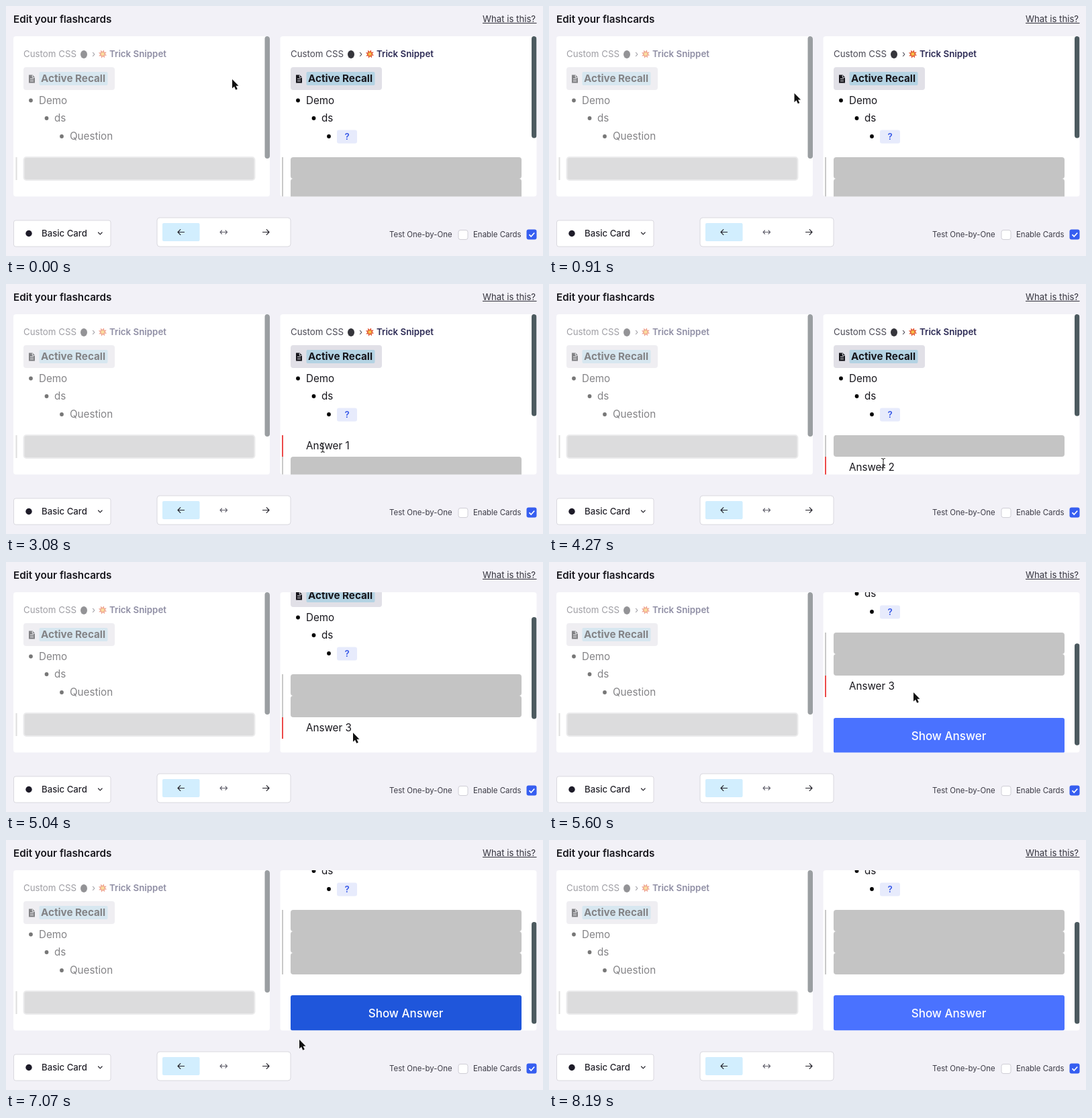
Animation of 800x372 px, one loop 8.26 s. Source, as an HTML page:

```html
<!DOCTYPE html>
<html lang="en">
<head>
<meta charset="utf-8">
<title>Edit your flashcards</title>
<style>
  html, body { margin: 0; width: 100%; height: 100%; overflow: hidden; background: #f2f1f7; }
  svg { display: block; width: 800px; height: 372px; font-family: Inter, "Open Sans", sans-serif; }
  .body { font-size: 15.2px; fill: #17161c; }
  .crumb { font-size: 13.3px; fill: #4a4954; }
  .small { font-size: 11.45px; fill: #3b3a45; }
  .semi { font-weight: 600; }
  .bold { font-weight: 700; }
  .box { fill: #fff; stroke: #d9d8df; }
  .icon { fill: none; stroke: #25242c; stroke-width: 1.2; stroke-linecap: round; stroke-linejoin: round; }
  .hidden { fill: #c4c4c4; }
</style>
</head>
<body>
<svg viewBox="0 0 800 372">
  <defs>
    <clipPath id="leftClip"><rect x="11" y="45" width="382" height="238.5" rx="4"/></clipPath>
    <clipPath id="rightClip"><rect x="408.5" y="45" width="382" height="238.5" rx="4"/></clipPath>
    <!-- breadcrumb, title and outline shared by both cards -->
    <g id="outline">
      <text class="crumb" x="424" y="76">Custom CSS</text>
      <ellipse cx="514" cy="72" rx="5" ry="6" fill="#35353b"/>
      <text class="crumb" x="526" y="76">›</text>
      <polygon id="burst" fill="#e0502f"/>
      <polygon id="spark" fill="#f8c34a"/>
      <text class="crumb semi" x="552" y="76" style="fill:#2d2b55">Trick Snippet</text>
      <rect x="424" y="91" width="136" height="34" rx="4" fill="#e1e0e7"/>
      <path d="M432 102.5h5.5l3.5 3.5v8.5h-9z" fill="#17161c"/>
      <path d="M434 108.5h5M434 111.5h5M437.3 103v3.4h3.5" stroke="#e1e0e7" fill="none"/>
      <rect x="447.500" y="98" width="102" height="20" rx="2" fill="#b4d3e3"/>
      <text class="body bold" x="450" y="113">Active Recall</text>
      <circle cx="435" cy="140.500" r="2.900"/>
      <text class="body" x="447" y="146">Demo</text>
      <circle cx="458.500" cy="167" r="2.900"/>
      <text class="body" x="470" y="172">ds</text>
      <circle cx="481" cy="194" r="2.900"/>
    </g>
  </defs>

  <rect width="800" height="372" fill="#f2f1f7"/>
  <text class="body semi" x="11" y="25">Edit your flashcards</text>
  <text x="710" y="23.500" font-size="13.2" fill="#34333d">What is this?</text>
  <path d="M710 25.500h80.500" stroke="#34333d"/>

  <g clip-path="url(#leftClip)">
    <rect x="11" y="45" width="383" height="239" fill="#fff"/>
    <g opacity=".53">
      <use href="#outline" x="-398"/>
      <text class="body" x="95" y="199">Question</text>
    </g>
    <rect x="14.500" y="225" width="2" height="34" fill="#dedede"/>
    <rect x="26.500" y="225" width="344" height="34" rx="4" fill="#dcdcdd" stroke="#ebebec" stroke-width="2"/>
    <rect x="385.500" y="45" width="7.500" height="182" rx="3.700" fill="#9a9ea1"/>
  </g>

  <g clip-path="url(#rightClip)">
    <rect x="408" y="45" width="383" height="239" fill="#fff"/>
    <g id="scroll">
      <use href="#outline"/>
      <rect x="493" y="184.500" width="30" height="20" rx="3" fill="#e7ebfc"/>
      <text class="semi" x="508" y="199" font-size="13.300" text-anchor="middle" fill="#3a5be8">?</text>
      <g id="answers"></g>
      <rect id="button" x="424" y="352" width="344" height="52.500" rx="3"/>
      <text x="595.500" y="385" font-size="17" font-weight="500" text-anchor="middle" fill="#fff">Show Answer</text>
    </g>
    <rect id="bar" x="783" width="7.500" height="151.500" rx="3.700" fill="#4c5a5f"/>
  </g>

  <rect class="box" x="11.500" y="319" width="144.500" height="39" rx="3"/>
  <circle cx="34" cy="338.500" r="4.700" fill="#1d1b28"/>
  <text x="53" y="343" font-size="13.200" font-weight="500" fill="#25242c">Basic Card</text>
  <path class="icon" d="M137.500 337l2.800 2.800 2.800-2.800"/>

  <rect class="box" x="225" y="315" width="199" height="43" rx="4"/>
  <rect x="233" y="323" width="55.500" height="27" rx="2" fill="#d2eefe"/>
  <path class="icon" d="M265.500 336.500h-9.500m3.800-3.800l-3.800 3.800 3.800 3.800"/>
  <path class="icon" stroke-width="1" style="stroke:#666570" d="M319 336.500h10.500m-8-2.500l-2.500 2.500 2.500 2.500m5.500-5l2.500 2.500-2.500 2.500"/>
  <path class="icon" d="M382.500 336.500h9.500m-3.800-3.800l3.800 3.800-3.800 3.800"/>

  <text class="small" x="571" y="344">Test One-by-One</text>
  <rect x="674" y="333.500" width="14" height="14" rx="3" fill="#fff" stroke="#cfced6"/>
  <text class="small" x="696" y="344">Enable Cards</text>
  <rect x="775.500" y="332.500" width="15" height="15" rx="3" fill="#365ef0"/>
  <path d="M779.500 340.200l2.700 2.800 5-5.500" fill="none" stroke="#fff" stroke-width="1.700"/>

  <g id="cursor">
    <path id="arrow" d="M0 0v13.500l3-2.800 2.300 5 2.500-1.100-2.300-4.800h4z" fill="#111" stroke="#fff" stroke-width="1" paint-order="stroke"/>
    <path id="beam" d="M-3-6.500q3 0 3 2 0-2 3-2M0-4.500v10M-3 7.500q3 0 3-2 0 2 3 2M-1.500 2.500h3" fill="none" stroke="#333" stroke-width="1.100"/>
  </g>
</svg>

<script>
const LOOP = 8260, STEP = 70, ROW = 32, FIRST = 225;
const $ = id => document.getElementById(id);

// Keys are [time, value...]; values run linearly between them.
const POINTER = [
  [0, 337, 109], [700, 339, 111], [1500, 440, 182], [1750, 445, 190],
  [2600, 452, 210], [3000, 470, 242], [3430, 480, 246], [3800, 494, 262],
  [4270, 498, 266], [4700, 500, 266], [5040, 517, 254], [5600, 543, 194],
  [5800, 544, 195], [6300, 556, 250], [6700, 530, 260], [7070, 437, 297],
  [7280, 422, 315], [7630, 405, 368], [7700, 400, 390]
];
const SCROLL = [[4700, 0], [5040, 58], [5300, 100], [5600, 120], [5900, 121]];
const PRESS = [[6100, 0], [6250, 1], [7090, 1], [7240, 0]];

function track(keys, t) {
  const i = keys.findIndex(k => k[0] > t);
  if (i < 0) return keys[keys.length - 1].slice(1);
  if (i === 0) return keys[0].slice(1);
  const a = keys[i - 1], b = keys[i], p = (t - a[0]) / (b[0] - a[0]);
  return a.slice(1).map((v, j) => v + (b[j + 1] - v) * p);
}

function star(id, outer, inner) {
  const points = Array.from({ length: 16 }, (_, i) => {
    const r = i % 2 ? inner : outer, a = i * Math.PI / 8 + 0.3;
    return `${542 + r * Math.cos(a)},${71.5 + r * Math.sin(a)}`;
  });
  $(id).setAttribute('points', points.join(' '));
}
star('burst', 6.5, 3.6);
star('spark', 3.8, 1.8);

$('answers').innerHTML = [0, 1, 2].map(i => {
  const y = FIRST + i * ROW;
  return `<g><rect x="411" y="${y}" width="2" height="${ROW}"/>
    <rect class="hidden" x="424" y="${y}" width="344" height="${ROW}" rx="4"/>
    <text class="body" x="447" y="${y + 21}">Answer ${i + 1}</text></g>`;
}).join('');
const rows = [...$('answers').children];

const show = (el, on) => el.setAttribute('visibility', on ? 'visible' : 'hidden');

function draw(t) {
  const [x, y] = track(POINTER, t);
  const [top] = track(SCROLL, t);
  const [press] = track(PRESS, t);
  const over = x > 411 && x < 768 && y < 283 ? Math.floor((y + top - FIRST) / ROW) : -1;

  rows.forEach((row, i) => {
    const [line, cover, text] = row.children;
    line.setAttribute('fill', i === over ? '#ec4a4a' : '#c9c9c9');
    show(cover, i !== over);
    show(text, i === over);
  });
  const mix = (a, b) => Math.round(a + (b - a) * press);
  $('button').setAttribute('fill', `rgb(${mix(74, 31)},${mix(114, 86)},${mix(255, 219)})`);
  $('scroll').setAttribute('transform', `translate(0 ${-top})`);
  $('bar').setAttribute('y', 45 + top * 0.636);

  const onText = over >= 0 && over < 3 && x > 447 && x < 515;
  show($('beam'), onText);
  show($('arrow'), !onText);
  $('cursor').setAttribute('transform', `translate(${x} ${y})`);
}

const start = performance.now();
function tick() {
  const t = (performance.now() - start) % LOOP;
  draw(Math.floor(t / STEP) * STEP);
  requestAnimationFrame(tick);
}
tick();
</script>
</body>
</html>
```
